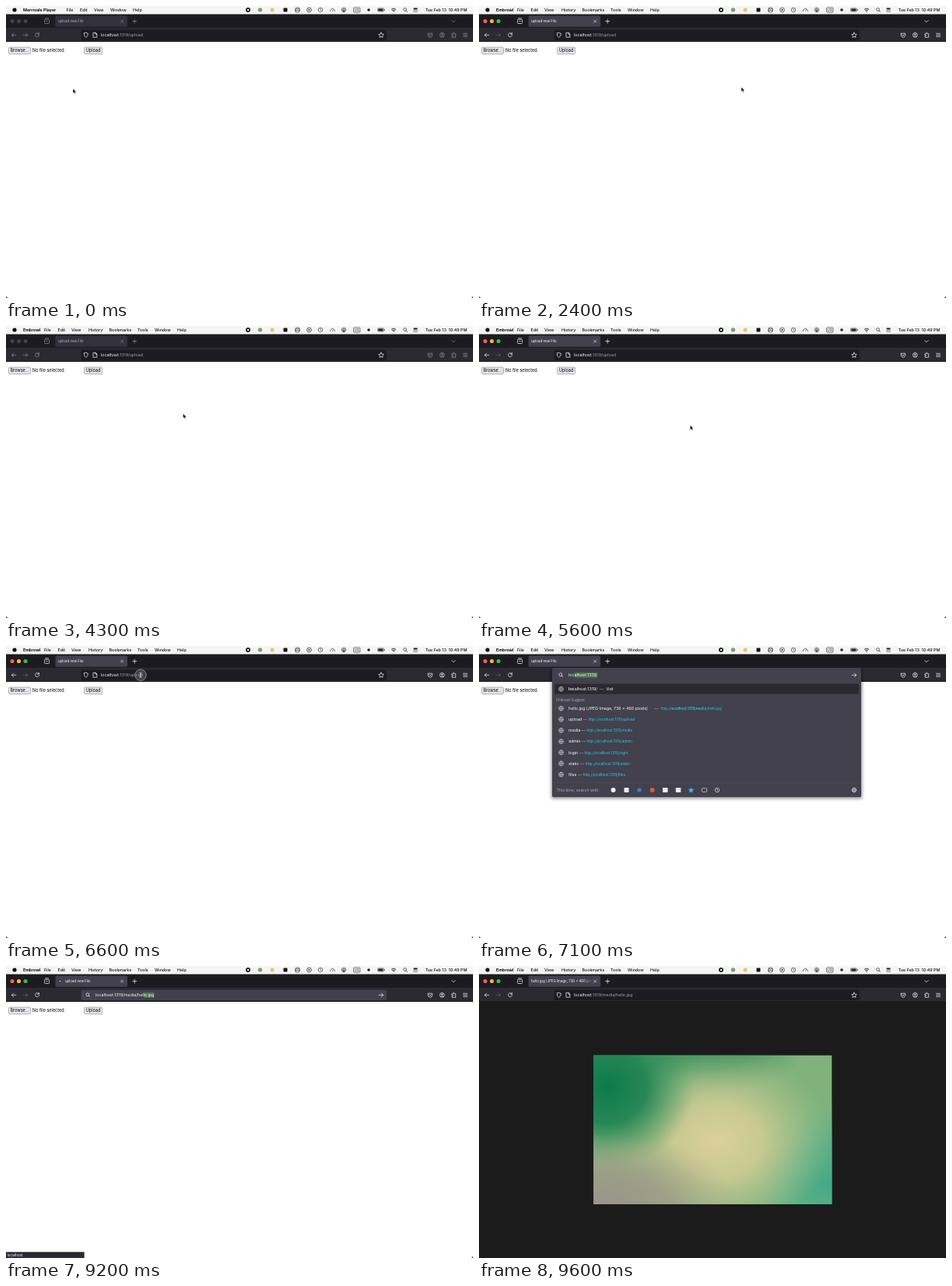
Write an HTML page that moves like this. It is 600 px wide and 375 px high and loops after 9.7 s.

```html
<!DOCTYPE html>
<html lang="en">
<head>
<meta charset="utf-8">
<title>Upload demo</title>
<style>
html, body { margin: 0; width: 100%; height: 100%; overflow: hidden; background: #fff; }
svg { display: block; width: 600px; height: 375px; }
text { font-family: Inter, "Noto Sans", sans-serif; white-space: pre; }
.b { font-weight: 600; }
</style>
</head>
<body>
<svg id="stage" viewBox="0 0 600 375"></svg>
<script>
const LOOP = 9700, TICK = 100;
const BROWSER = 'Embrowl', HOST = 'localhost:1319/';

// Drawing helpers
const rect = (x, y, w, h, fill, more = '') =>
  `<rect x="${x}" y="${y}" width="${w}" height="${h}" fill="${fill}" ${more}/>`;
const dot = (x, y, r, fill, more = '') => `<circle cx="${x}" cy="${y}" r="${r}" fill="${fill}" ${more}/>`;
const line = (d, color, w = 0.7, more = '') =>
  `<path d="${d}" fill="none" stroke="${color}" stroke-width="${w}" stroke-linecap="round" stroke-linejoin="round" ${more}/>`;
const ring = (x, y, r, color, w = 0.7) => dot(x, y, r, 'none', `stroke="${color}" stroke-width="${w}"`);
const text = (x, y, s, size, fill, more = '') =>
  `<text x="${x}" y="${y}" font-size="${size}" fill="${fill}" ${more}>${s}</text>`;
const group = (id, ...parts) => `<g id="${id}">${parts.join('')}</g>`;
const lens = (x, y, c, r = 1.9) => ring(x, y, r, c) + line(`M${x + r * .75} ${y + r * .75}l1.5 1.5`, c);
const globe = (x, y) => ring(x, y, 2.9, '#e4e4e8', .6) +
  line(`M${x - 2.9} ${y}h5.8M${x} ${y - 2.9}q-2.6 2.9 0 5.8q2.6 -2.9 0 -5.8`, '#e4e4e8', .5);
const clock = (x, y, c, r = 2.7) => ring(x, y, r, c, .6) + line(`M${x} ${y - 1.5}v1.6l1 .8`, c, .6);

const defs = `<defs>
  <radialGradient id="glow"><stop offset="0" stop-color="#dbd09c"/><stop offset=".4" stop-color="#cfcb95" stop-opacity=".9"/><stop offset="1" stop-color="#b5c58c" stop-opacity="0"/></radialGradient>
  <radialGradient id="deep"><stop offset="0" stop-color="#0d7a49"/><stop offset=".45" stop-color="#1c8351" stop-opacity=".9"/><stop offset="1" stop-color="#3d9660" stop-opacity="0"/></radialGradient>
  <radialGradient id="clay"><stop offset="0" stop-color="#989488"/><stop offset=".5" stop-color="#a09c88" stop-opacity=".85"/><stop offset="1" stop-color="#b0ab8a" stop-opacity="0"/></radialGradient>
  <radialGradient id="teal"><stop offset="0" stop-color="#45aa86"/><stop offset=".5" stop-color="#58b088" stop-opacity=".8"/><stop offset="1" stop-color="#78b786" stop-opacity="0"/></radialGradient>
  <clipPath id="imgBox"><rect width="306.5" height="191.5"/></clipPath>
  <clipPath id="dlgBox"><rect x="133" y="54.5" width="334" height="187.5" rx="4.5"/></clipPath>
  <clipPath id="tabBox"><rect x="64" y="12" width="81" height="15"/></clipPath>
  <linearGradient id="fade"><stop offset=".5" stop-color="#42414d" stop-opacity="0"/><stop offset="1" stop-color="#42414d"/></linearGradient>
  <filter id="soft" x="-20%" y="-20%" width="140%" height="150%"><feGaussianBlur stdDeviation="7"/></filter>
  <filter id="soft2" x="-5%" y="-10%" width="110%" height="130%"><feGaussianBlur stdDeviation="2"/></filter>
  <g id="picture" clip-path="url(#imgBox)">
    ${rect(0, 0, 306.5, 191.5, '#80b27b')}
    <ellipse cx="140" cy="-8" rx="130" ry="62" fill="url(#deep)" opacity=".6"/>
    <ellipse cx="300" cy="165" rx="115" ry="115" fill="url(#teal)"/>
    <ellipse cx="160" cy="110" rx="145" ry="120" fill="url(#glow)"/>
    <ellipse cx="18" cy="40" rx="112" ry="105" fill="url(#deep)"/>
    <ellipse cx="10" cy="195" rx="175" ry="95" fill="url(#clay)"/>
  </g>
</defs>`;

const menu = (id, names) =>
  group(id, ...names.map(([x, s], i) => text(x, 6.9, s, 5.3, '#111', i ? 'font-weight="500"' : 'font-weight="700"')));

function menuBar() {
  const k = '#222';
  const printer = line('M372.5 3.8v-1.6h4v1.6M372.3 6.4h-.8v-2.6h6v2.6h-.8M372.8 5.6h3.6v2.4h-3.6z', k, .6);
  const wifi = line('M495.2 4.2q2.8 -2.6 5.6 0M496.4 5.6q1.6 -1.4 3.2 0', k, .9) + dot(498, 7, .7, k);
  return rect(0, 0, 600, 10.5, '#f5f4f5') + dot(11, 5, 2.6, '#111') +
    menu('menuPlayer', [[22, 'Merrivale Player'], [77.5, 'File'], [95, 'Edit'], [113, 'View'], [134, 'Window'], [163, 'Help']]) +
    menu('menuFull', [[22, BROWSER], [49, 'File'], [66.5, 'Edit'], [84, 'View'], [106, 'History'], [132.5, 'Bookmarks'],
      [169, 'Tools'], [191, 'Window'], [220, 'Help']]) +
    menu('menuShort', [[22, BROWSER], [49, 'Edit']]) +
    dot(311, 5, 2.9, '#111') + rect(310, 4, 2, 2, '#fff') +
    dot(326.5, 5, 2.7, '#7fa06c') + dot(342, 5, 2.5, '#e6c565') + rect(356.5, 2.5, 5, 5, '#151515', 'rx="1"') +
    printer + ring(389.5, 5, 2.9, k) + `<path d="M388.7 3.6l2.3 1.4l-2.3 1.4z" fill="${k}"/>` + clock(404, 5, k, 2.8) +
    line('M416.4 6.6a3 3 0 0 1 6 0M419.4 6.4l1.2 -1.4', k, .6, 'stroke-dasharray="1 .5"') +
    ring(434, 5, 2.8, k, .6) + ring(434, 5, 1.4, k, .6) + line('M434 5v2.6', k, 1) +
    rect(446.5, 2, 8.5, 6.2, 'none', `rx="1" stroke="${k}" stroke-width=".6"`) + text(450.8, 6.9, 'US', 4.6, k, 'text-anchor="middle"') +
    dot(466, 5, 1.8, k) + rect(477.5, 2.8, 8, 4.4, 'none', `rx="1.2" stroke="${k}" stroke-width=".5"`) +
    rect(478.3, 3.5, 6.2, 3, k, 'rx=".6"') + rect(486, 4.2, .7, 1.6, k) + wifi + lens(512.6, 4.5, k) +
    rect(523.4, 2.4, 5.4, 2.2, k, 'rx="1.1"') + rect(523.6, 5.6, 5, 1.9, 'none', `rx=".9" stroke="${k}" stroke-width=".5"`) +
    text(592.3, 6.9, 'Tue Feb 13  10:49 PM', 5.3, '#111', 'text-anchor="end" font-weight="500"');
}

function chrome() {
  const c = '#fbfbfe';
  const lights = [[8, '#ff5f57'], [16.5, '#febc2e'], [25, '#28c840']];
  return rect(0, 10.5, 600, 17.7, '#1c1b22') + rect(0, 28, 600, 18, '#2b2a33') + rect(0, 45.2, 600, .8, '#0f0e14') +
    rect(63.5, 12.5, 92.5, 14.2, '#42414d', 'id="tab" rx="1.7"') +
    group('lightsOn', ...lights.map(([x, f]) => dot(x, 19.5, 2.5, f))) +
    group('lightsOff', ...lights.map(([x]) => dot(x, 19.5, 2.5, '#45444e'))) +
    group('dimmable',
      rect(49.5, 17.3, 6, 5.2, 'none', `rx="1" stroke="${c}" stroke-width=".7"`),
      line('M50.5 15.8h4M51.5 19.2l1 1l1 -1', c),
      line('M147.6 18.1l3 3m0 -3l-3 3', c, .6), line('M162.7 19.6h5m-2.5 -2.5v5', c),
      line('M572.8 18.6l2.2 2.2l2.2 -2.2', c),
      line('M12.8 37.3h-5.4m2.2 -2.2l-2.2 2.2l2.2 2.2', c),
      line('M42 35.6a2.5 2.5 0 1 0 .5 1.9M42.4 34.4v1.8h-1.8', c),
      line('M542.3 35.2h5.4v2.2a2.7 2.7 0 0 1 -5.4 0zM543.7 36.8l1.3 1.2l1.3 -1.2', c),
      ring(560.3, 37.3, 2.9, c), dot(560.3, 36.5, 1, c), line('M558.7 39.2q1.6 -1.7 3.2 0', c),
      line('M573 35.8h1.5q-.3 -1.6 .8 -1.6t.8 1.6h1.6v4.4h-4.7v-1.4q1.4 .1 1.4 -.9t-1.4 -.8z', c),
      line('M587.6 35.3h5M587.6 37.3h5M587.6 39.3h5', c)) +
    line('M22.2 37.3h5.4m-2.2 -2.2l2.2 2.2l-2.2 2.2', '#fbfbfe', .7, 'id="forward"') +
    `<g clip-path="url(#tabBox)">${text(67, 21.3, '', 4.4, c, 'id="title"')}</g>` +
    rect(125, 13, 20, 13, 'url(#fade)', 'id="titleFade"') + dot(69.5, 19.5, .7, c, 'id="spinner"') +
    rect(96.5, 30.7, 392.5, 13.2, '#1c1b22', 'id="field" rx="1.7"') +
    group('address',
      line('M102.7 34.3l2.6 .9q.2 3.8 -2.6 5.2q-2.8 -1.4 -2.6 -5.2z', c),
      line('M112.3 34.3h2.8l1.7 1.7v4.2h-4.5zM115 34.4v1.8h1.7', c),
      `<text x="122" y="39.2" font-size="5.3" fill="#a3a2ab"><tspan fill="${c}">localhost</tspan><tspan id="path"></tspan></text>`,
      line('M482 34.1l1 2.1l2.3 .3l-1.7 1.6l.4 2.3l-2 -1.1l-2 1.1l.4 -2.3l-1.7 -1.6l2.3 -.3z', c));
}

const button = (id, x, w, s) =>
  rect(x, 53, w, 8.6, '#e9e9ed', `id="${id}" rx="1.5" stroke="#8f8f9d" stroke-width=".7"`) +
  text(x + w / 2, 59.2, s, 5.5, '#000', 'text-anchor="middle"');

const page = () => rect(0, 46, 600, 329, '#fff') + button('browse', 3.5, 28, 'Browse...') +
  text(34, 59.2, '', 5.5, '#000', 'id="file"') + button('send', 100.5, 23, 'Upload');

const viewer = () => group('viewer', rect(0, 45, 600, 330, '#1c1b1c'), '<use href="#picture" x="147" y="114.5"/>');

function dialog() {
  const green = '#3fc14b', w = '#ececec';
  const side = [['Documents', 76.2], ['Desktop', 87.8], ['Downloads', 99.5], ['Movies', 111.2], ['Painters Barn...', 122.8],
    ['Puffra Drive', 148], ['Shared', 159.6]];
  const tags = [['Red', '#ff5b56'], ['Orange', '#f7a63b'], ['Yellow', '#f8d94a'], ['Green', '#7fdc5c'], ['Blue', '#3aa3f5'], ['Purple', '#b9708c']];
  const icon = (y, i) => [
    line(`M142 ${y - 4.4}h2.6l1.4 1.4v3.4h-4z`, green, .6),
    rect(141.2, y - 4.1, 5.8, 4, 'none', `rx=".7" stroke="${green}" stroke-width=".6"`) + line(`M142.5 ${y - 1.3}h3.2`, green),
    ring(144.1, y - 1.9, 2.6, green, .6) + line(`M144.1 ${y - 3.3}v2.6m-1 -1l1 1l1 -1`, green, .6),
    rect(141.2, y - 4.1, 5.8, 4.3, 'none', `rx=".7" stroke="${green}" stroke-width=".6"`) + line(`M141.2 ${y - 2.6}h5.8`, green, .6),
    line(`M141.2 ${y - 4.2}h2l.7 .7h3.1v3.6h-5.8zM141.2 ${y - 2.5}h5.8`, green, .6),
    line(`M142.4 ${y - .1}a1.4 1.4 0 0 1 .1 -2.8a2 2 0 0 1 3.8 .4a1.2 1.2 0 0 1 0 2.4z`, green, .6),
    line(`M141.2 ${y - 4.2}h2l.7 .7h3.1v3.6h-5.8zM141.2 ${y - 2.5}h5.8`, green, .6)][i];
  const head = (y, s) => text(140, y, s, 4.5, '#9a9a9a', 'class="b"');
  const section = (y, s) => text(206, y, s, 5.9, '#a8a8a8', 'class="b"') + rect(206, y + 4.6, 257, .4, '#3b3b3b');
  const grid = x => [0, 2.2, 4.4].map(d => rect(x + d, 66.2, 1.5, 1.5, w) + rect(x + d, 68.3, 1.5, 1.5, w)).join('');
  const chev = x => line(`M${x} 67.5l1.2 1.2l1.2 -1.2`, w, .6);
  return group('dialog',
    rect(134, 62, 332, 186, '#000', 'rx="6" opacity=".5" filter="url(#soft)"'),
    '<g clip-path="url(#dlgBox)">',
    rect(133, 54, 334, 189, '#2a2a2a'), rect(133, 54, 64.5, 189, '#4d4d4e'), rect(197.5, 54, .6, 189, '#161616'),
    head(66.5, 'Favorites'), head(138, 'Puffra'), head(174.7, 'Tags'),
    rect(137.5, 80, 56, 11.7, '#6f6f70', 'rx="2"'),
    ...side.map(([s, y], i) => icon(y, i) + text(150, y, s, 5.3, w)),
    ...tags.map(([s, f], i) => dot(144, 183 + i * 11.65, 2.2, f) + text(150, 184.9 + i * 11.65, s, 5.3, w)),
    '</g>',
    rect(206, 63.8, 20, 8.4, '#424242', 'rx="1.7"'), line('M211.8 66.3l-1.6 1.7l1.6 1.7M220.2 66.3l1.6 1.7l-1.6 1.7', '#777'),
    rect(229.5, 63.8, 18.8, 8.4, '#545454', 'rx="1.7"'), grid(233), chev(242.2),
    rect(252, 63.8, 18.8, 8.4, '#545454', 'rx="1.7"'), grid(255.5), chev(264.7),
    rect(289, 63.8, 87, 8.4, '#585858', 'rx="1.7"'), rect(292.5, 65.7, 6.3, 4.7, '#3fb4ea', 'rx=".7"'), text(301, 70, 'Desktop', 5.3, w),
    rect(368.2, 64.5, 7, 7, '#2f9e3c', 'rx="1.5"'), line('M370.5 67l1.2 -1.3l1.2 1.3M370.5 69l1.2 1.3l1.2 -1.3', '#fff', .7),
    rect(394.5, 63.8, 63.5, 8.4, '#242424', 'rx="1.7" stroke="#414141" stroke-width=".5"'), lens(399.8, 67.5, '#ccc', 1.7), text(405, 69.9, 'Search', 5.3, '#888'),
    section(90, 'Today'), section(160.8, 'Yesterday'),
    rect(206.5, 101.5, 32, 25, '#4c4c4c', 'id="pick" rx="2"'),
    rect(210, 105.3, 25, 17.2, '#f4f4f4'), '<use href="#picture" transform="translate(211 106.3) scale(.075 .0793)"/>',
    text(222.2, 135.2, 'hello.jpg', 5.2, w, 'text-anchor="middle"'), text(222.2, 141.2, '736×460', 4.2, '#4a86d8', 'text-anchor="middle"'),
    rect(211.8, 174, 21.2, 21.5, '#5865f2', 'rx="4.8"'), text(222.2, 206, 'Chatlum', 5.2, w, 'text-anchor="middle"'),
    rect(198, 217.6, 269, .5, '#3b3b3b'),
    rect(395, 224.8, 30, 8.7, '#666', 'rx="1.8"'), text(410, 231.1, 'Cancel', 5.2, '#fff', 'text-anchor="middle"'),
    rect(428.5, 224.8, 29.5, 8.7, '#3c3c3c', 'id="openBtn" rx="1.8"'), text(443.2, 231.1, 'Open', 5.2, '#777', 'id="openText" text-anchor="middle"'),
    rect(133, 54.5, 334, 187.5, 'none', 'rx="4.5" stroke="#666" stroke-width=".5"'));
}

function searchPanel() {
  const c = '#fbfbfe', g = '#b0afb8', cyan = '#2bcbe6';
  const row = (s, i) => globe(105.5, 94.2 + i * 14.17) +
    text(115, 96 + i * 14.17, `${s} <tspan fill="${g}">— </tspan><tspan fill="${cyan}" font-size="4.6">http://${HOST}${s}</tspan>`, 5.3, c);
  const engines = dot(172.5, 100, 3, '#f2f2f6') + rect(186.5, 97, 6, 6, '#f2f2f2', 'rx=".7"') + dot(206, 100, 2.8, '#2f7fd0') +
    dot(222.7, 100, 3, '#de5833') + rect(236, 97, 6.5, 6, '#f2f2f2', 'rx=".7"') + rect(252.8, 97, 6.5, 6, '#eee', 'rx=".7"');
  return group('panel',
    rect(93, 30, 399, 80, '#000', 'id="panelShade" opacity=".45" filter="url(#soft2)"'),
    rect(94, 28, 397, 81, '#42414d', 'id="panelBack" rx="1.8"'),
    group('results',
      rect(97, 48.5, 391, 13.3, '#2b2a33', 'rx="1.5"'), globe(105.5, 55.2),
      `<text x="115" y="57" font-size="5.3" fill="${c}"><tspan id="hitA" class="b"></tspan><tspan id="hitB"></tspan><tspan fill="${g}">  — </tspan><tspan font-size="4.6"> Visit</tspan></text>`,
      text(99.3, 71.4, BROWSER + ' Suggest', 4.4, g),
      globe(105.5, 80.2), text(115, 82, 'hello.jpg (JPEG Image, 736 × 460 pixels)', 5.3, c),
      text(225.5, 82, `<tspan fill="${g}">— </tspan><tspan font-size="4.5"> http://<tspan class="b">${HOST}med</tspan>ia/hello.jpg</tspan>`, 5.3, cyan),
      group('more', ...['upload', 'media', 'admin', 'login', 'static', 'files'].map(row)),
      group('footer',
        rect(94, 90, 397, .4, '#52515e'), text(99.5, 101.8, 'This time, search with:', 5.2, g), engines,
        `<path d="M272.5 96.4l1.1 2.4l2.6 .3l-1.9 1.8l.5 2.6l-2.3 -1.3l-2.3 1.3l.5 -2.6l-1.9 -1.8l2.6 -.3z" fill="#35b8ea"/>`,
        rect(286.5, 97.6, 6, 4.8, 'none', `rx="1" stroke="${c}" stroke-width=".6"`), clock(306, 100, c),
        ring(482, 100, 2.3, c, .9), ring(482, 100, .8, c, .5), ring(482, 100, 3, c, .7).replace('/>', 'stroke-dasharray="1 1.35"/>')))) +
    group('entry', lens(104.8, 36.7, c), rect(115, 33.9, 0, 7, '#4b7251', 'id="mark"'),
      `<text x="115" y="39.2" font-size="5.3" fill="${c}"><tspan id="typed"></tspan><tspan id="rest"></tspan></text>`,
      line('M479.3 37.3h5.4m-2.2 -2.2l2.2 2.2l-2.2 2.2', c));
}

const status = () => group('status', rect(0, 367.3, 100.5, 7.7, '#2b2a33', 'stroke="#55545f" stroke-width=".4"'), text(1.7, 373, 'localhost', 4.6, '#fbfbfe'));
const corners = () => '<path d="M0 371.5V375h3.5Q0 375 0 371.5zM600 371.5V375h-3.5Q600 375 600 371.5z" fill="#111"/>';
const pointer = () => group('cursor',
  group('ring', dot(0, 0, 7.2, '#888', 'fill-opacity=".35" stroke="#8a8a8a" stroke-width="1"')),
  '<path id="arrow" d="M0 0v6.1l1.4 -1.3l.9 2.1l1.1 -.5l-.9 -2h1.9z" fill="#000" stroke="#fff" stroke-width=".5"/>',
  line('M-1.3 -3.2q1.3 0 1.3 .9v4.6q0 .9 -1.3 .9M1.3 -3.2q-1.3 0 -1.3 .9v4.6q0 .9 1.3 .9', '#ddd', .7, 'id="beam"'));

const stage = document.getElementById('stage');
stage.innerHTML = defs + menuBar() + chrome() + page() + viewer() + dialog() + searchPanel() + status() + corners() + pointer();
const ui = {};
stage.querySelectorAll('[id]').forEach(el => ui[el.id] = el);

// Changes to the scene, by time
const NONE = 'No file selected.';
const steps = [
  [0, { menu: 'menuPlayer', active: false, file: NONE, path: 'upload', title: 'upload new File' }],
  [100, { menu: 'menuFull' }],
  [2400, { active: true }],
  [2900, { hover: 'browse', ring: true }],
  [3000, { menu: 'menuShort', active: false, dialog: true, ring: false }],
  [3900, { ring: true, pick: true }],
  [4000, { ring: false }],
  [4100, { ring: true }],
  [4200, { ring: false }],
  [4300, { menu: 'menuFull', dialog: false, hover: '' }],
  [4400, { active: true, file: 'hello.jpg' }],
  [4900, { hover: 'send' }],
  [5000, { ring: true }],
  [5100, { ring: false, loading: true }],
  [5300, { loading: false, file: NONE, hover: '' }],
  [6600, { ring: true }],
  [6700, { ring: false, panel: 18.5, typed: '', rest: HOST + 'upload' }],
  [6900, { panel: 166, typed: 'l', rest: 'ocalhost:1319/', hidden: true }],
  [7000, { typed: 'lo', rest: 'calhost:1319/' }],
  [7100, { typed: 'loc', rest: 'alhost:1319/' }],
  [7200, { typed: HOST, rest: '' }],
  [7300, { panel: 81, typed: HOST + 'm', rest: 'edia/' }],
  [7400, { typed: HOST + 'me', rest: 'dia/' }],
  [7500, { typed: HOST + 'med', rest: 'ia/' }],
  [7700, { typed: HOST + 'media/', rest: '' }],
  [8100, { typed: HOST + 'media/h', rest: 'ello.jpg' }],
  [8300, { typed: HOST + 'media/he', rest: 'llo.jpg' }],
  [8500, { typed: HOST + 'media/hel', rest: 'lo.jpg' }],
  [8900, { panel: 0, loading: true, entered: true }],
  [9400, { loading: false, entered: false, viewer: true, path: 'media/hello.jpg', title: 'hello.jpg (JPEG Image, 736 × 460 pixels)' }]
];

// Pointer path: time, x, y
const track = [[0, 86, 106], [100, 200, 105], [200, 337, 104], [2400, 337, 104], [2500, 222, 97], [2600, 222, 97],
  [2700, 124, 79], [2800, 124, 79], [2900, 48, 69], [3200, 48, 69], [3700, 227.5, 112.5], [4400, 227.5, 112.5],
  [4900, 112, 57], [5200, 112, 57], [5800, 327, 152], [6000, 327, 152], [6500, 173, 37.3], [LOOP, 173, 37.3]];

function pointerAt(t) {
  const i = track.findIndex(k => k[0] > t), [ta, xa, ya] = track[i - 1], [tb, xb, yb] = track[i];
  const p = (t - ta) / (tb - ta), e = p * p * (3 - 2 * p);
  return [xa + (xb - xa) * e, ya + (yb - ya) * e];
}

const show = (id, on) => ui[id].style.display = on ? '' : 'none';
const put = (id, s) => ui[id].textContent = s;
const set = (id, name, v) => ui[id].setAttribute(name, v);

function draw(t) {
  const s = Object.assign({}, ...steps.filter(k => k[0] <= t).map(k => k[1]));
  for (const m of ['menuPlayer', 'menuFull', 'menuShort']) show(m, s.menu === m);
  show('lightsOn', s.active);
  show('lightsOff', !s.active);
  set('dimmable', 'opacity', s.active ? 1 : .5);
  set('forward', 'opacity', s.active ? .3 : .45);
  set('tab', 'fill', s.active ? '#42414d' : '#33323c');
  put('title', s.title);
  set('title', 'x', s.loading ? 76 : 67);
  set('title', 'opacity', s.active ? 1 : .65);
  show('titleFade', s.viewer);
  show('spinner', s.loading);
  set('spinner', 'cx', 69.5 + 2 * Math.sin((t - 9200) / 160));
  show('status', s.loading);
  show('viewer', s.viewer);

  put('file', s.file);
  for (const b of ['browse', 'send']) set(b, 'fill', s.hover === b ? '#c9c9d1' : '#e9e9ed');
  show('dialog', s.dialog);
  show('pick', s.pick);
  set('openBtn', 'fill', s.pick ? '#2f9e3c' : '#3c3c3c');
  set('openText', 'fill', s.pick ? '#fff' : '#777');

  const editing = s.panel > 0 || s.entered;
  show('address', !editing);
  put('path', ':1319/' + s.path);
  set('field', 'fill', s.entered ? '#42414d' : '#1c1b22');
  show('panel', s.panel > 0);
  show('entry', editing);
  if (editing) {
    const tall = s.panel > 100;
    set('panelBack', 'height', s.panel);
    set('panelShade', 'height', s.panel);
    show('results', s.panel > 20);
    show('more', tall);
    set('footer', 'transform', `translate(0 ${tall ? 85 : 0})`);
    for (const id of ['typed', 'hitA']) put(id, s.typed);
    for (const id of ['rest', 'hitB']) put(id, s.rest);
    set('mark', 'x', 115 + (s.typed ? ui.typed.getComputedTextLength() : 0));
    set('mark', 'width', s.rest ? ui.rest.getComputedTextLength() : 0);
  }

  const [x, y] = pointerAt(t), beam = y < 45;
  show('cursor', !s.hidden);
  set('cursor', 'transform', `translate(${x} ${y})`);
  show('ring', s.ring);
  show('arrow', !beam);
  show('beam', beam);
}

const start = performance.now();
let last = -1;
function frame() {
  const t = Math.floor((performance.now() - start) % LOOP / TICK) * TICK;
  if (t !== last) draw(last = t);
  requestAnimationFrame(frame);
}
frame();
</script>
</body>
</html>
```
